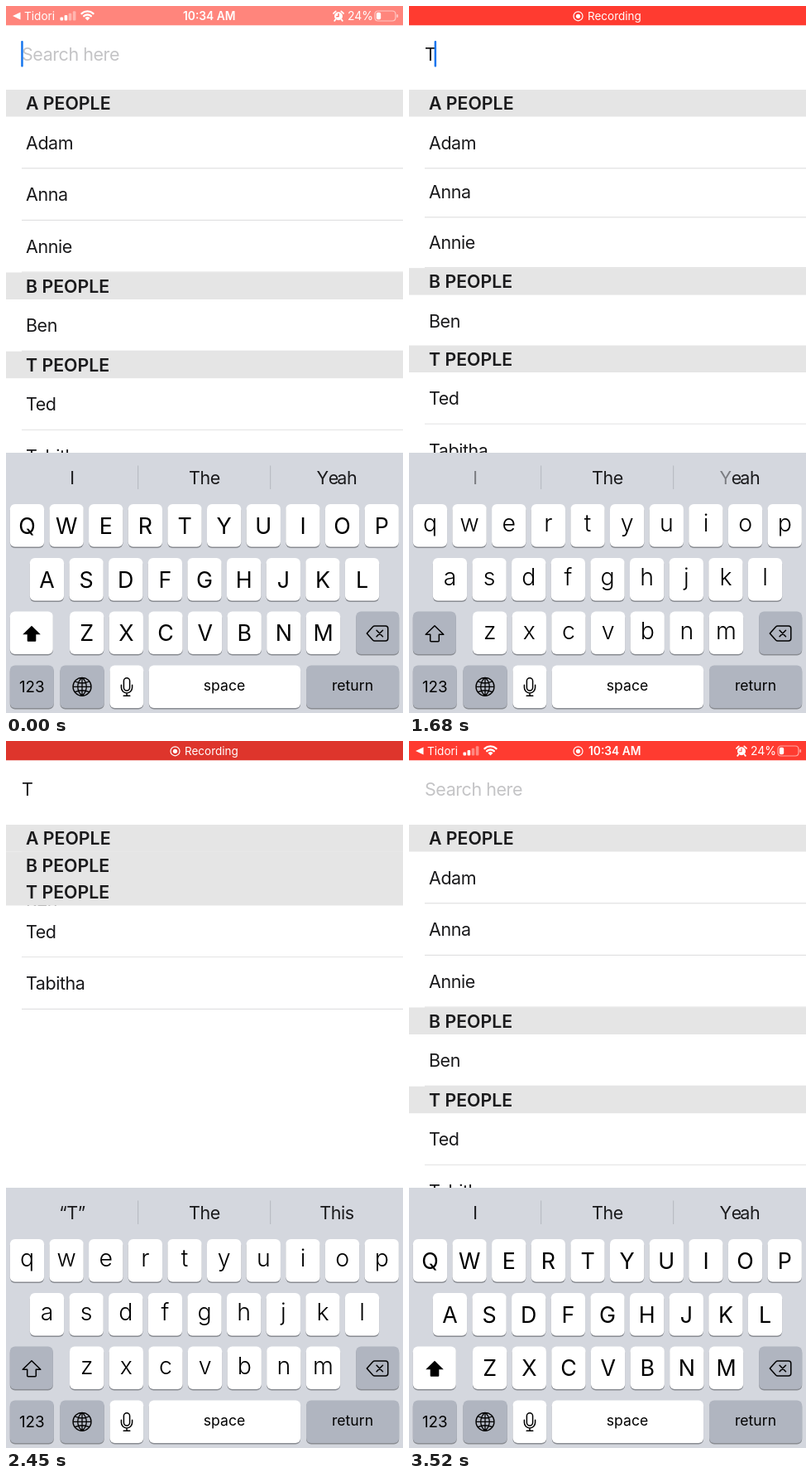
Animation, 480 px wide and 853 px high, one loop 3570 ms. Source, as an HTML page with a canvas:

```html
<!DOCTYPE html>
<html lang="en">
<head>
<meta charset="utf-8">
<title>Searchable list</title>
<style>
html, body { margin: 0; width: 480px; height: 853px; overflow: hidden; background: #fff; }
canvas { display: block; }
</style>
</head>
<body>
<canvas id="stage" width="480" height="853"></canvas>
<script>
const ctx = document.getElementById('stage').getContext('2d');
const LOOP = 3570, TYPED = 1645, ERASED = 2790;
const ROW = 62.67, HEAD = 32.5, LIST_TOP = 101;
const INK = '#1a1a1c', DARK_KEY = '#b0b5c0';

const clamp = v => Math.min(1, Math.max(0, v));
const ramp = (t, from, to) => clamp((t - from) / (to - from));
const mix = (a, b, k) => `rgb(${a.map((v, i) => Math.round(v + (b[i] - v) * k))})`;

// cubic-bezier(.42, 0, .58, 1)
function easeInOut(x) {
  let lo = 0, hi = 1, s = 0.5;
  for (let i = 0; i < 18; i++) {
    s = (lo + hi) / 2;
    const at = 1.26 * s * (1 - s) ** 2 + 1.74 * s * s * (1 - s) + s ** 3;
    if (at < x) lo = s; else hi = s;
  }
  return s * s * (3 - 2 * s);
}

function box(x, y, w, h, color) {
  ctx.fillStyle = color;
  ctx.fillRect(x, y, w, h);
}

function roundBox(x, y, w, h, r, color) {
  ctx.fillStyle = color;
  ctx.beginPath();
  ctx.roundRect(x, y, w, h, r);
  ctx.fill();
}

function setFont(size, weight = 400, spacing = 0) {
  ctx.font = `${weight} ${size}px Inter, sans-serif`;
  ctx.letterSpacing = spacing + 'px';
}

function text(str, x, y, size, { weight, color = INK, align = 'left', spacing } = {}) {
  setFont(size, weight, spacing);
  ctx.fillStyle = color;
  ctx.textAlign = align;
  ctx.fillText(str, x, y);
}

function withAlpha(alpha, draw) {
  if (alpha <= 0) return;
  ctx.save();
  ctx.globalAlpha *= alpha;
  draw();
  ctx.restore();
}

function icon(path, x, y, { color = '#000', width = 1.6, fill = false } = {}) {
  ctx.save();
  ctx.translate(x, y);
  ctx.strokeStyle = ctx.fillStyle = color;
  ctx.lineWidth = width;
  ctx.lineCap = ctx.lineJoin = 'round';
  const shape = new Path2D(path);
  if (fill) ctx.fill(shape); else ctx.stroke(shape);
  ctx.restore();
}

/* status bar */

function statusItems() {
  const white = '#fff';
  icon('M8 12 L17.5 7.5 V16.5 Z', 0, 0, { color: white, fill: true });
  text('Tidori', 22, 17, 13.6, { color: white });
  for (let i = 0; i < 4; i++) {
    const h = 4 + i * 2.4;
    withAlpha(i < 2 ? 1 : 0.4, () => roundBox(65.5 + i * 5.1, 17.5 - h, 3.6, h, 1, white));
  }
  icon('M-7 -6.8 A10.2 10.2 0 0 1 7 -6.8 M-4.3 -3.8 A6.3 6.3 0 0 1 4.3 -3.8', 98.5, 16, { color: white, width: 2.4 });
  icon('M0 1.5 L-3 -1.6 A4.4 4.4 0 0 1 3 -1.6 Z', 98.5, 16, { color: white, fill: true });

  icon('M-5 0 A5 5 0 1 1 5 0 A5 5 0 1 1 -5 0 Z', 402, 12.3, { color: white, fill: true });
  icon('M-6 -3.5 L-3.3 -5.9 M6 -3.5 L3.3 -5.9 M-3.6 4 L-4.8 5.6 M3.6 4 L4.8 5.6', 402, 12.3, { color: white, width: 1.8 });
  icon('M0 -3 V0.5 H-2.4', 402, 12.3, { color: '#ff4b40', width: 1.1 });
  text('24%', 413, 17, 14, { color: white });
  withAlpha(0.55, () => {
    icon('M450 6 H467 Q471 6 471 10 V14 Q471 18 467 18 H450 Q446 18 446 14 V10 Q446 6 450 6 Z', 0, 0, { color: white, width: 1.2 });
    roundBox(472.3, 10, 1.8, 4, 1, white);
  });
  roundBox(447.8, 7.8, 5.4, 8.4, 1.8, white);
}

function statusBar(t) {
  const pulse = clamp(0.45 - 0.6 * Math.cos((t - 1740) * Math.PI / 1000));
  const red = [255, 59, 48].map((v, i) => v + ([215, 52, 43][i] - v) * pulse);
  box(0, 0, 480, 23.3, mix([255, 133, 124], red, ramp(t, 0, 280)));

  const started = ramp(t, 300, 550), back = ramp(t, 2850, 3080);
  const time = x => text('10:34 AM', x, 17, 13.8, { weight: 600, color: '#fff' });
  withAlpha(1 - ramp(t, 150, 450), statusItems);
  withAlpha(ramp(t, 3030, 3400), statusItems);
  withAlpha(1 - started, () => time(214));
  withAlpha(back, () => time(217));
  withAlpha(started * (1 - back), () => text('Recording', 216, 17, 13.5, { color: '#fff' }));
  withAlpha(started, () => {
    icon('M-5.5 0 A5.5 5.5 0 1 1 5.5 0 A5.5 5.5 0 1 1 -5.5 0', 204.5, 12.3, { color: '#fff', width: 1.2 });
    roundBox(201.9, 9.7, 5.2, 5.2, 2.6, '#fff');
  });
}

/* search field and list */

function searchField(t, hasText) {
  box(0, 23.3, 480, LIST_TOP - 23.3, '#fff');
  if (hasText) text('T', 19, 65.5, 21.5);
  else text('Search here', 19, 65.5, 21.5, { color: '#c4c4c6', spacing: -0.45 });
  const since = t < TYPED ? t : t < ERASED ? t - TYPED : t - ERASED;
  const phase = since % 1000;
  const visible = 1 - ramp(phase, 500, 620) + ramp(phase, 880, 1000);
  withAlpha(visible, () => roundBox(hasText ? 30.6 : 18.2, 42, 2.5, 31.5, 1, '#1676ee'));
}

function row(name, y) {
  box(0, y, 480, ROW, '#fff');
  text(name, 24, y + 39.3, 21.5, { spacing: -0.45 });
  box(19, y + ROW - 1, 461, 1.2, '#e0e0e1');
}

function header(letter, y) {
  box(0, y, 480, HEAD, '#e5e5e5');
  text(letter + ' PEOPLE', 24, y + 24.2, 21.3, { weight: 600 });
}

function list(t) {
  const removing = t < ERASED;
  const collapsed = removing
    ? easeInOut(ramp(t, TYPED, TYPED + 300))
    : 1 - easeInOut(ramp(t, 2797, 3097));
  const open = 1 - collapsed;
  const first = LIST_TOP + HEAD;
  const yB = first + 3 * ROW * open;
  const yT = yB + HEAD + ROW * open;

  ctx.save();
  ctx.beginPath();
  ctx.rect(0, LIST_TOP, 480, 539 - LIST_TOP);
  ctx.clip();
  box(0, LIST_TOP, 480, 440, '#fff');
  ['Adam', 'Anna', 'Annie'].map((name, i) => {
    const travel = i && i + (removing ? 1 : 0);
    return [name, first + ROW * (i - travel * collapsed)];
  }).reverse().forEach(([name, y]) => row(name, y));
  header('A', LIST_TOP);
  row('Ben', yB + HEAD);
  header('B', yB);
  row('Ted', yT + HEAD);
  row('Tabitha', yT + HEAD + ROW);
  header('T', yT);
  ctx.restore();
}

/* keyboard */

function fadeWord(word, x, alphaAt) {
  setFont(21.5, 400, -0.4);
  const left = x - ctx.measureText(word).width / 2;
  [...word].forEach((char, i) => {
    const offset = ctx.measureText(word.slice(0, i)).width;
    withAlpha(alphaAt(i), () => text(char, left + offset, 576.5, 21.5, { spacing: -0.4 }));
  });
}

function suggestions(t) {
  const typed = t - TYPED, erased = t - ERASED;
  const leave = since => i => 1 - ramp(since, 10 + i * 25, 60 + i * 25);
  const enter = order => i => ramp(typed, 50 + 35 * order(i), 110 + 35 * order(i));
  if (erased < 0) {
    fadeWord('I', 80, leave(typed));
    fadeWord('Yeah', 400, leave(typed));
    fadeWord('“T”', 80, enter(i => i + 1));
    fadeWord('This', 400, enter(i => (i + 3) % 4));
  } else {
    fadeWord('“T”', 80, leave(erased));
    fadeWord('This', 400, leave(erased));
    const grow = ramp(erased, 200, 320);
    ctx.save();
    ctx.translate(79 + grow, 569);
    ctx.scale(0.6 + 0.4 * grow, 0.6 + 0.4 * grow);
    ctx.translate(-80, -569);
    fadeWord('I', 80, () => ramp(erased, 190, 300));
    ctx.restore();
    fadeWord('Yeah', 394 + 6 * grow, i => ramp(erased, 100 + 25 * i, 180 + 25 * i));
  }
  fadeWord('The', 240, () => 1);
  for (const x of [159, 319]) box(x, 554.5, 1.2, 28.5, '#b9bcc4');
}

function key(x, y, w, color = '#fff') {
  roundBox(x, y + 1.5, w, 51.5, 6, '#898c92');
  roundBox(x, y, w, 51.5, 6, color);
}

function letterRow(letters, x, y, upper) {
  [...letters].forEach((char, i) => {
    const left = x + i * 47.64;
    key(left, y, 41.3);
    if (upper) text(char, left + 20.7, y + 35.8, 26.8, { color: '#000', align: 'center' });
    else text(char.toLowerCase(), left + 20.7, y + 33.3, 28.5, { weight: 300, color: '#000', align: 'center' });
  });
}

function keyPopup() {
  ctx.save();
  ctx.shadowColor = 'rgba(0,0,0,.3)';
  ctx.shadowBlur = 3;
  icon('M190 537 H243 Q252 537 252 546 V582 C252 596 237 596 237 610 V646 Q237 652 231 652 H202 Q196 652 196 646 V610 C196 596 181 596 181 582 V546 Q181 537 190 537 Z', 0, 0, { color: '#fff', fill: true });
  ctx.restore();
  text('T', 216.5, 584, 43, { weight: 300, color: '#000', align: 'center' });
}

function keyboard(t, upper) {
  box(0, 539, 480, 314, '#d4d7de');
  suggestions(t);
  letterRow('QWERTYUIOP', 4.8, 601, upper);
  letterRow('ASDFGHJKL', 28.8, 666, upper);
  letterRow('ZXCVBNM', 77, 730.5, upper);

  key(4.8, 730.5, 52, upper ? '#fff' : DARK_KEY);
  const arrow = 'M0 -9.5 L10.8 1 H5.3 V8.5 Q5.3 9.5 4.3 9.5 H-4.3 Q-5.3 9.5 -5.3 8.5 V1 H-10.8 Z';
  icon(arrow, 31, 757.3, { fill: upper, width: 1.5 });

  const erasing = t >= 2690 && t < 2840;
  key(423.2, 730.5, 52, erasing ? '#fff' : DARK_KEY);
  icon('M-13 0 L-5.8 -8 Q-4.8 -9 -3.5 -9 H9.5 Q12.5 -9 12.5 -6 V6 Q12.5 9 9.5 9 H-3.5 Q-4.8 9 -5.8 8 Z', 449.3, 757, { fill: erasing, width: 1.5 });
  icon('M-1.2 -3.7 L6.2 3.7 M6.2 -3.7 L-1.2 3.7', 449.3, 757, { color: erasing ? '#fff' : '#000' });

  const label = { color: '#000', align: 'center' };
  key(4.8, 795.5, 53, DARK_KEY);
  text('123', 31.3, 827.5, 18.8, label);
  key(65.5, 795.5, 53.2, DARK_KEY);
  icon('M-11 0 A11 11 0 1 1 11 0 A11 11 0 1 1 -11 0 H11 M0 -11 V11 M0 -11 C-7 -5 -7 5 0 11 C7 5 7 -5 0 -11 M-8.5 -6.3 Q0 -2.6 8.5 -6.3 M-8.5 6.3 Q0 2.6 8.5 6.3', 92, 821.3, { width: 1.3 });
  key(125.5, 795.5, 40.7);
  icon('M-3.6 -7 A3.6 3.6 0 0 1 3.6 -7 V1 A3.6 3.6 0 0 1 -3.6 1 Z M-6.6 -2 V1 A6.6 6.6 0 0 0 6.6 1 V-2 M0 7.6 V11 M-3.8 11 H3.8', 146, 821.3, { width: 1.5 });
  key(172.8, 795.5, 183.3);
  text('space', 264, 826, 17.6, label);
  key(363, 795.5, 112.2, DARK_KEY);
  text('return', 419, 826, 17.6, label);

  if (t >= 1520 && t < TYPED) keyPopup();
}

function render(t) {
  const hasText = t >= TYPED && t < ERASED;
  box(0, 0, 480, 853, '#fff');
  searchField(t, hasText);
  list(t);
  keyboard(t, !hasText);
  statusBar(t);
}

const start = performance.now();
function tick() {
  render((performance.now() - start) % LOOP);
  requestAnimationFrame(tick);
}
tick();
</script>
</body>
</html>
```
